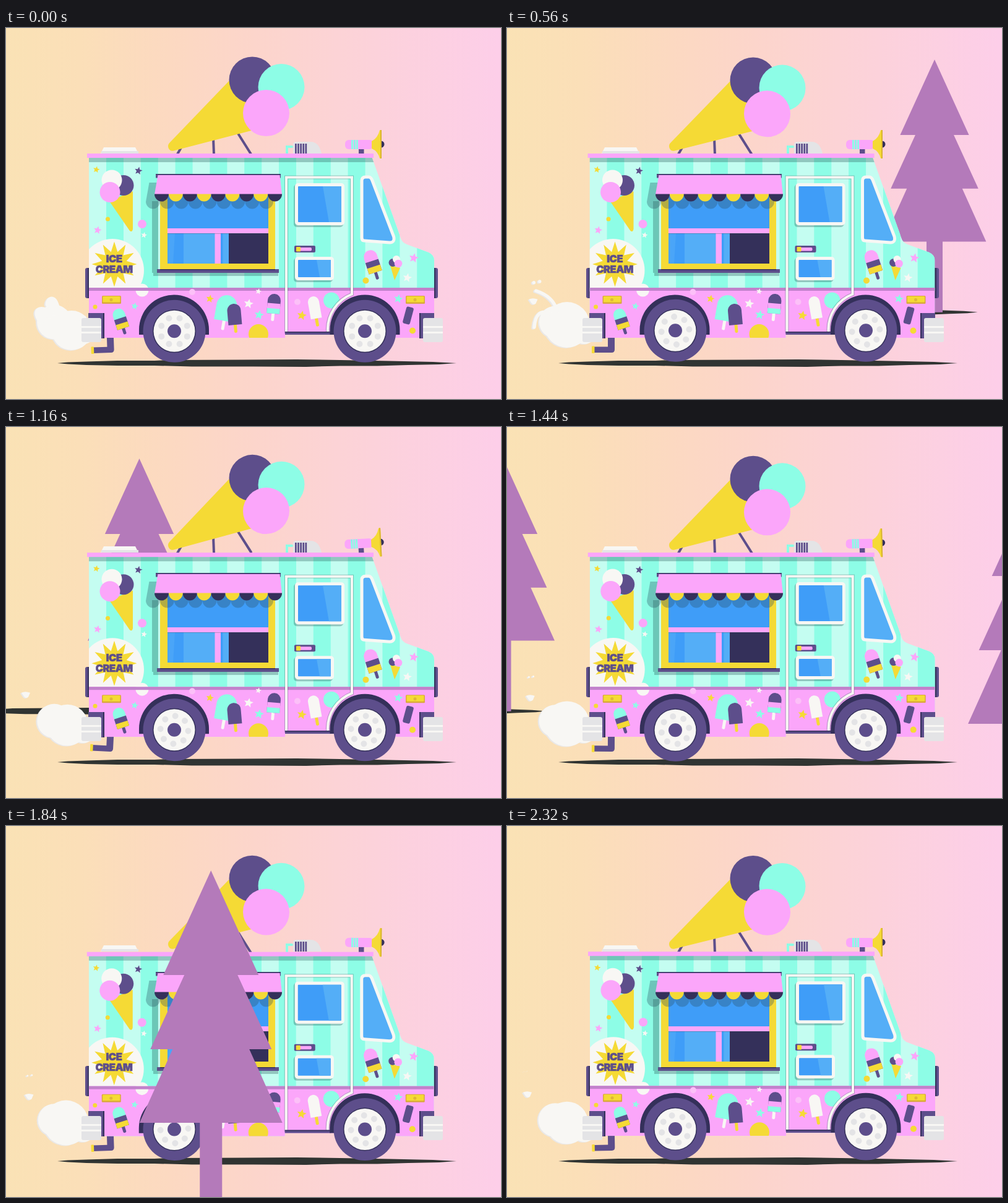
These frames come from a looping animation (800 px wide and 600 px high, 2360 ms). An HTML page:

```html
<!DOCTYPE html>
<html lang="en">
<head>
<meta charset="utf-8">
<title>Ice cream truck</title>
<style>
html, body { margin: 0; height: 100%; overflow: hidden; }
svg { display: block; width: 100vw; height: 100vh; }
text { font: 900 16.5px Inter, sans-serif; letter-spacing: -.5px; text-anchor: middle; stroke-width: .6; stroke-linejoin: round; }
</style>
</head>
<body>
<svg id="stage" viewBox="0 0 800 600"></svg>
<script>
const LOOP = 2360, STEP = 40;
const PINK = '#fba6fa', MINT = '#8dfde6', PALE = '#c4fdf1', PURPLE = '#5d4e8b', NAVY = '#34305a',
  YELLOW = '#f5da35', WHITE = '#f8f7f4', GREY = '#e4e4e6', BLUE = '#3f9df8', SKY = '#54aef7',
  TREE = '#b47aba', GROUND = '#303432', SHADE = 'rgba(40,85,85,.32)';

const circle = (x, y, r, c) => `<circle cx="${x}" cy="${y}" r="${r}" fill="${c}"/>`;
const rect = (x, y, w, h, c, r = 0) => `<rect x="${x}" y="${y}" width="${w}" height="${h}" rx="${r}" fill="${c}"/>`;
const path = (d, c) => `<path d="${d}" fill="${c}"/>`;
const line = (d, c, w) => `<path d="${d}" fill="none" stroke="${c}" stroke-width="${w}" stroke-linecap="round"/>`;
const group = (attrs, ...parts) => `<g ${attrs}>${parts.join('')}</g>`;
const repeat = (n, f) => Array.from({ length: n }, (_, i) => f(i)).join('');

function star(x, y, r, c, n = 5, inner = .45, turn = 0.2) {
  const pts = Array.from({ length: 2 * n }, (_, i) => {
    const a = turn + i * Math.PI / n, d = i % 2 ? r * inner : r;
    return [(x + d * Math.sin(a)).toFixed(1), (y - d * Math.cos(a)).toFixed(1)];
  });
  return path('M' + pts.join('L') + 'Z', c);
}

function popsicle(x, y, turn, w, h, colors, stickColor, stick) {
  const r = w / 2, b = h / 2;
  const bands = colors.slice(1).map((c, i) => {
    const top = -b + h * (i ? .74 : .48);
    return rect(-r, top, w, b - top, c);
  });
  return group(`transform="translate(${x} ${y}) rotate(${turn})"`,
    rect(-2.5, b - 2, 5, stick + 2, stickColor, 2),
    path(`M${-r} ${b}V${r - b}a${r} ${r} 0 0 1 ${w} 0V${b}z`, colors[0]), ...bands);
}

const groundShape = 'M83 542L100 540.5 130 539.5 180 538 240 538 265 537 385 536.5 470 536 540 537 620 538.5 690 540 728 542 700 544 650 545 600 546.5 540 546.5 485 548 400 547.5 300 547.5 240 546 180 546 130 545 100 543.5Z';
const treeShape = 'M0 0L77 169H43L98 289H62L115.5 408H18V566H-18V408H-115.5L-62 289H-98L-43 169H-77Z';
const bodyShape = 'M134 208H591L638 340Q640 347 648 350L683 363Q692 367 692 376V501H630V496H451V501H134Z';

function awning(fill, scallops) {
  return path('M245.5 238H442.5L446 269H240Z', fill) +
    repeat(9, i => path(`M${240 + i * 22.9} 268.6h22.9a11.45 12 0 0 1-22.9 0z`, scallops[i % 2]));
}

function windowBox() {
  return group('',
    rect(236, 280, 10, 116, SHADE), rect(238, 396, 202, 5, SHADE),
    rect(249, 262, 186, 128, YELLOW), rect(261, 268, 163, 57, BLUE),
    rect(261, 332, 77, 49, SKY), rect(261, 332, 26, 49, BLUE), path('M261 332h12l-3 49h-9z', '#4aa5f8'),
    rect(347, 332, 14, 49, SKY), rect(347, 332, 3.5, 49, BLUE), rect(360, 332, 64, 49, NAVY),
    rect(261, 324, 163, 8, PINK), rect(337.5, 324, 9.5, 57, PINK),
    rect(261, 332, 163, 1, SHADE),
    rect(244, 390, 197, 6, PURPLE), rect(249, 390, 186, 1.5, NAVY),
    group('opacity=".32" transform="translate(-14 12)"', awning('#2a4f60', ['#2a4f60', '#2a4f60'])),
    rect(242, 236, 202, 6.5, PURPLE), rect(242, 236, 202, 1, NAVY),
    awning(PINK, [NAVY, YELLOW]));
}

function decorations() {
  return group('',
    // rear panel
    star(146, 229, 5.5, YELLOW), star(214, 231, 6.5, PURPLE), star(148, 327, 6.5, PINK), star(223, 335, 5, WHITE),
    circle(220, 317, 7, PINK), circle(164.5, 309, 3.5, YELLOW),
    path('M167 280L205 264V325Q204 331 200 328Z', YELLOW),
    circle(190, 254.5, 16.5, PURPLE), circle(171, 246, 16.5, WHITE), circle(168, 265.5, 16.5, PINK),
    // nose
    star(659, 372, 8, PINK), star(648.5, 404, 7.5, WHITE), circle(581.5, 408.5, 5, YELLOW),
    popsicle(591.5, 377.5, -18, 22, 37, [PINK, PURPLE, YELLOW], PURPLE, 12),
    path('M621 384L637 388 628 408Z', YELLOW), circle(625, 379.5, 6.5, PURPLE),
    circle(631, 374, 6, WHITE), circle(634, 381, 6.3, PINK),
    // skirt
    circle(144, 451, 3.5, YELLOW), popsicle(184.5, 470, -18, 20, 33, [MINT, PURPLE, YELLOW], PURPLE, 10),
    star(208, 450, 6, MINT), circle(301, 427, 5, '#fcc0f8'), star(329.5, 438, 6.5, YELLOW),
    popsicle(356, 453, 10, 33, 42, [MINT], WHITE, 15), popsicle(369, 463, -5, 22, 34, [PURPLE], YELLOW, 13),
    star(392, 446, 8, WHITE), star(409, 464, 8, MINT), star(408, 426, 5, WHITE), circle(408, 495, 16, YELLOW),
    popsicle(433, 446, 5, 21, 32, [PURPLE, PINK, MINT], WHITE, 12),
    circle(471, 443, 5, '#fcc0f8'), star(478, 465, 8, YELLOW),
    circle(526, 440.5, 13, MINT), popsicle(498.5, 452, -10, 18, 36, [WHITE], YELLOW, 13),
    star(634, 438, 7.5, MINT), group('transform="rotate(15 650 465)"', rect(644, 451, 12, 28, PURPLE, 3)),
    circle(657, 489.5, 5, YELLOW));
}

function badge() {
  return circle(172, 392, 51, WHITE) + star(175, 382, 36.5, YELLOW, 12, .56, 0) +
    `<g fill="${PURPLE}" stroke="${PURPLE}"><text x="174.7" y="378.5">ICE</text><text x="174.7" y="395.5">CREAM</text></g>`;
}

function frame(x, y, w, h) {
  return rect(x - 2, y + 2, w, h + 1, SHADE, 5) + rect(x, y, w, h, WHITE, 5) + rect(x + 5, y + 5, w - 10, h - 10, BLUE, 1);
}

function door() {
  const outline = 'M453 492V241.5H559V430.5A61 61 0 0 0 520 490';
  return line(outline, SHADE, 6) + line(outline, WHITE, 4) + rect(451, 491, 74, 5, PURPLE) + rect(451, 491, 74, 1.5, NAVY) +
    frame(467, 251, 80, 68) + path('M512 256H542V314H522Z', SKY) +
    frame(467, 370, 63, 38) + path('M502 375H525V403H507Z', SKY) +
    rect(466, 352, 34, 11, PURPLE, 2) + rect(472, 355, 22, 5.5, PINK, 2) + rect(469, 354, 7, 7.5, YELLOW, 1);
}

const lamp = x => rect(x, 433, 31, 13, '#d9a93c', 1.5) + rect(x + 1.5, 434, 28, 9.5, YELLOW, 1) + circle(x + 15, 439.5, 2.5, '#dfb63a');
const bumper = x => rect(x, 469, 32, 39, GREY, 3) + rect(x, 482, 32, 3, WHITE) + rect(x, 491, 32, 3, WHITE);
const arch = x => path(`M${x - 56.5} 496V488a56.5 56.5 0 0 1 113 0V496z`, NAVY);

function wheel(x) {
  return circle(x, 490, 50.5, PURPLE) + circle(x, 490, 35, NAVY) + circle(x, 490, 33.5, WHITE) +
    group(`class="spokes" data-x="${x}"`, repeat(8, i => {
      const a = (i + .5) * Math.PI / 4;
      return circle(x + 22.5 * Math.cos(a), 490 + 22.5 * Math.sin(a), 5, GREY);
    })) + circle(x, 490, 11, PURPLE);
}

function bodywork() {
  return group('clip-path="url(#body)"',
    rect(130, 200, 570, 310, PALE),
    repeat(10, i => rect(162 + i * 55.8, 200, 28, 225, MINT)),
    rect(130, 209, 480, 8, SHADE), badge(),
    rect(130, 420, 570, 90, PINK), circle(220, 424, 10.5, WHITE),
    rect(130, 420, 570, 5, '#c182cb'), decorations(), door(),
    arch(271.5), arch(580)) +
    group(`stroke="${WHITE}" stroke-width="5"`,
      path('M575 247Q575 241 581 241H586Q590 241 592 247L626.5 337Q629 347 620 347L579 344Q575 344 575 339Z', SKY)) +
    rect(131, 203, 463, 7, PINK) + lamp(155) + lamp(646);
}

const roofGear = group('',
  path('M158 193H209L214 203H153Z', WHITE), rect(154, 199, 60, 4, GREY),
  line('M454 203V192H462', MINT, 4), path('M464 203V188Q464 184 470 184H492Q506 184 510 203Z', GREY),
  repeat(5, i => rect(467 + i * 4.1, 187, 2.8, 16, PURPLE)));

const megaphone = group('id="megaphone"',
  rect(570, 194, 8.5, 10, PURPLE), circle(606, 188, 5.5, NAVY), rect(548, 181, 46, 15, PINK, 6),
  repeat(3, i => rect(558 + i * 4, 181, 3, 15, MINT)),
  path('M591 183Q601 178 604 165H607V211H604Q601 199 591 195Z', YELLOW), rect(605, 165, 2, 46, '#d9b530'));

const bigCone = group('id="cone"',
  line('M286 188L277 204M335 178L336 204M374 169L396 204', PURPLE, 4),
  path('M264 186L362 84 410 120 402 164.5 271 198.5Q265 200 262.5 194 261 189 264 186Z', YELLOW),
  circle(398, 84, 37.5, PURPLE), circle(445, 95.5, 37.5, MINT), circle(420.5, 137.5, 37.5, PINK));

const stage = document.getElementById('stage');
stage.innerHTML = `<defs><linearGradient id="sky">
  <stop offset="0" stop-color="#fae2b5"/><stop offset=".15" stop-color="#fbdfb8"/><stop offset=".33" stop-color="#fcd9c1"/>
  <stop offset=".5" stop-color="#fcd5cb"/><stop offset=".75" stop-color="#fcd2db"/><stop offset="1" stop-color="#fdcee9"/>
  </linearGradient><clipPath id="body"><path d="${bodyShape}"/></clipPath></defs>` +
  rect(0, 0, 800, 600, 'url(#sky)') +
  group('id="backTree"',
    group('transform="translate(-362 -24) scale(.593 .892)"', path(groundShape, GROUND)),
    group('transform="translate(0 51) scale(.722)"', path(treeShape, TREE))) +
  group('id="smoke"') +
  path(groundShape, GROUND) +
  group('id="pipe"', path('M163 498H174V520Q174 525 169 525H140V515.5H163Z', PURPLE), rect(137, 514.5, 4.5, 11.5, YELLOW, 1)) +
  rect(128, 388, 9, 49, PURPLE, 3) + rect(132, 388, 3, 49, NAVY) + rect(689, 388, 9, 49, PURPLE, 3) + rect(691, 388, 3, 49, NAVY) +
  bigCone + roofGear + megaphone +
  group('id="shell"', bodywork()) + windowBox() +
  path('M133 461H159V502H152V470H133Z', PURPLE) + rect(157, 461, 2, 41, NAVY) + bumper(122) +
  path('M692 461H668V502H676V470H692Z', PURPLE) + rect(668, 461, 2, 41, NAVY) + bumper(674) +
  group('id="wheels"', wheel(272), wheel(580)) +
  group('id="frontTree"', path(treeShape, TREE));

// time, shell x, shell y, cone tilt, wheel y, megaphone angle, pipe angle
const wobble = [
  [0, 0, 0, 0, .3, 0, -2],
  [560, -.5, 0, .45, -.7, 0, 0],
  [880, .8, 1, -.2, -.7, -2.5, 0],
  [1160, 0, .2, -.7, -.2, -3, 3],
  [1680, -.5, 0, .8, .7, 0, -2],
  [2000, 0, 1.4, .3, .3, 1, -2],
  [2320, 0, .2, .6, 0, 0, -1],
  [LOOP, 0, 0, 0, .3, 0, -2]
];

function wobbleAt(t) {
  const i = wobble.findIndex(k => k[0] > t), a = wobble[i - 1], b = wobble[i];
  const u = (t - a[0]) / (b[0] - a[0]);
  return a.map((v, j) => v + (b[j] - v) * u);
}

function smoke(p) {
  const swell = Math.sin(Math.PI * p), rise = Math.min(1, p * 5, (1 - p) * 15);
  const reach = Math.min(1, p / .25), torn = (p - .35) / .65;
  const puffs = c => {
    let out = circle(77, 475.5, 28 - 2 * swell, c) + circle(105 - 9 * rise, 489 - 9 * rise, 32 + rise + 4 * swell, c) + circle(124, 491, 20, c);
    if (p < .5) {
      const w = 15 * (1 - p * 1.5);
      out += line(`M80 458Q74 434 ${70 - 24 * reach} ${446 - 21 * reach}`, c, w) +
        line(`M68 462Q46 452 ${56 - 13 * reach} ${470 + 14 * reach}`, c, w);
    }
    if (torn > 0) {
      const k = 1 - torn;
      out += circle(45 - 22 * torn, 414 - 20 * torn, 3 * k, c) + circle(55 - 28 * torn, 412 - 18 * torn, 3 * k, c) +
        path(`M${36 - 13 * torn} ${440 - 11 * torn}q6-3 14 0l-3 7q-4 3-7-1z`, c);
    }
    return out;
  };
  return group('transform="translate(-1 1)"', puffs('#eae8e7')) + group('transform="translate(1 0)"', puffs(WHITE));
}

const byId = id => document.getElementById(id);
const move = (id, value) => byId(id).setAttribute('transform', value);

function draw(now) {
  const t = Math.floor(now % LOOP / STEP) * STEP;
  const [, x, y, tilt, wheelY, horn, pipe] = wobbleAt(t);
  const turns = t / LOOP * 6;
  move('backTree', `translate(${691 - .7925 * (t - 560)} 0)`);
  move('frontTree', `translate(${543 - 1.3234 * (t - 1680)} 72)`);
  move('shell', `translate(${x} ${y})`);
  move('cone', `translate(264 192) skewY(${tilt}) translate(-264 -192)`);
  move('wheels', `translate(0 ${wheelY})`);
  move('megaphone', `rotate(${horn} 574 202)`);
  move('pipe', `rotate(${pipe} 169 502)`);
  document.querySelectorAll('.spokes').forEach(g => g.setAttribute('transform', `rotate(${turns * 360} ${g.dataset.x} 490)`));
  byId('smoke').innerHTML = smoke(turns % 1);
  requestAnimationFrame(() => draw(performance.now()));
}
draw(0);
</script>
</body>
</html>
```
